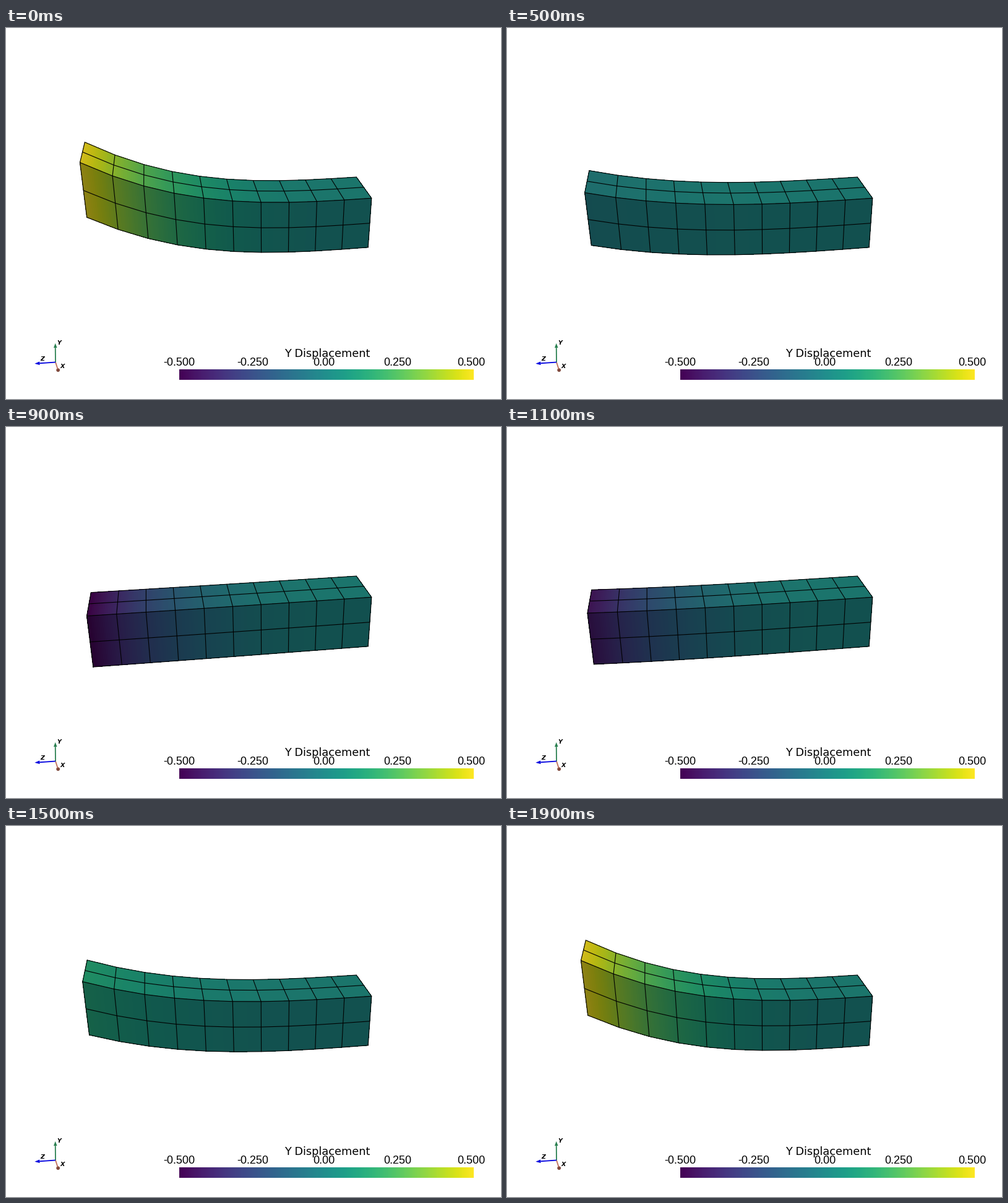
A matplotlib script for the animation above (2000 ms loop, 800 px wide and 600 px high).

```python
import numpy as np
import matplotlib.pyplot as plt
from matplotlib.animation import FuncAnimation
from matplotlib.collections import LineCollection, PolyCollection

W, H, DPI = 800, 600, 100
PX = 72 / DPI
FRAMES, INTERVAL = 20, 100
CELLS, STRIPS = 10, 16
LENGTH, PEAK = 5.0, 0.5
TOP_LIGHT = np.array([0.83, 0.81, 0.765])
FRONT_LIGHT = 0.56
VIRIDIS = plt.get_cmap("viridis")

# Perspective camera with a 30 degree vertical view angle.
EYE = np.array([11.915, 6.114, 3.612])
FOCUS = np.array([0, 0.375, 2])
VIEW_UP = np.array([-0.4255, 0.9024, -0.0679])
ZOOM = H / 2 / np.tan(np.radians(15))


def unit(vector):
    return vector / np.linalg.norm(vector)


FORWARD = unit(FOCUS - EYE)
RIGHT = unit(np.cross(FORWARD, VIEW_UP))
UP = np.cross(RIGHT, FORWARD)


def project(x, y, z):
    ray = np.stack(np.broadcast_arrays(x, y, z), axis=-1) - EYE
    scale = ZOOM / (ray @ FORWARD)
    return np.column_stack([W / 2 + scale * (ray @ RIGHT),
                            H / 2 - scale * (ray @ UP)])


def strips(a, b):
    return np.stack([a[:-1], a[1:], b[1:], b[:-1]], axis=1)


fig = plt.figure(figsize=(W / DPI, H / DPI), dpi=DPI, facecolor="white")
ax = fig.add_axes([0, 0, 1, 1])
ax.axis("off")


def label(x, y, text, size, font, **style):
    ax.text(x, y, text, fontsize=size * PX, family=font, ha="center",
            va="baseline", color="black", **style)


def draw_color_bar(left=280, right=756, top=552, bottom=569):
    ax.imshow(np.linspace(0, 1, 256)[None], cmap=VIRIDIS, aspect="auto",
              interpolation="nearest", extent=(left, right, bottom, top))
    label(519, 532, "Y Displacement", 17.7, "DejaVu Sans")
    for value in np.linspace(-PEAK, PEAK, 5):
        x = left + (right - left) * (value + PEAK) / (2 * PEAK)
        # Labels without a minus sign sit a little to the left.
        label(x if value < 0 else x - 4, 546.5, f"{value:#.3g}", 18,
              "Liberation Sans")


def draw_axes_marker(origin=(80, 540.5), size=34):
    origin = np.array(origin)
    looks = [("X", "#c0705c", (6, -5)), ("Y", "#2a8050", (6, 2)),
             ("Z", "#0000e0", (12, -5))]
    for axis, (name, color, offset) in enumerate(looks):
        step = size * np.array([RIGHT[axis], -UP[axis]])
        tip, neck = origin + step, origin + 0.76 * step
        side = 2.8 * unit(np.array([-step[1], step[0]]))
        ax.plot(*zip(origin, neck), color=color, lw=1.8 * PX,
                solid_capstyle="butt")
        if name == "X":  # this cone points at the viewer
            ax.add_patch(plt.Circle((tip + neck) / 2, 2.9, color="#80493c", lw=0))
        else:
            ax.fill(*zip(tip, neck + side, neck - side), color=color, lw=0)
        label(*(tip + offset), name, 9.5, "DejaVu Sans",
              weight="bold", style="italic")


draw_color_bar()
draw_axes_marker()
ax.set_xlim(0, W)
ax.set_ylim(H, 0)

faces = PolyCollection([], antialiased=False, linewidth=0, zorder=3)
edges = LineCollection([], colors="black", linewidths=1.1 * PX, zorder=4,
                       capstyle="round", joinstyle="round")
ax.add_collection(faces, autolim=False)
ax.add_collection(edges, autolim=False)

nodes = np.linspace(0, LENGTH, CELLS + 1)
slices = np.linspace(0, LENGTH, CELLS * STRIPS + 1)
node_shape = PEAK * (nodes / LENGTH) ** 3
slice_shape = np.interp(slices, nodes, node_shape)


def draw(frame):
    swing = np.cos(2 * np.pi * frame / (FRAMES - 1))

    # The rest shape is already bent once by the same displacement.
    lift = (1 + swing) * slice_shape
    back, ridge, base = (project(x, y + lift, slices)
                         for x, y in [(0, 1), (1, 1), (1, 0)])
    value = swing * (slice_shape[:-1] + slice_shape[1:]) / 2
    color = VIRIDIS((value + PEAK) / (2 * PEAK))[:, :3]
    faces.set_verts(np.concatenate([strips(back, ridge), strips(ridge, base)]))
    faces.set_facecolor(np.concatenate([color * TOP_LIGHT, color * FRONT_LIGHT]))

    lift = (1 + swing) * node_shape
    rails = [project(x, y + lift, nodes)
             for x, y in [(0, 1), (0.5, 1), (1, 1), (1, 0.5), (1, 0)]]
    ribs = [np.array(rib) for rib in zip(*rails)]
    edges.set_segments(rails + ribs)
    return faces, edges


animation = FuncAnimation(fig, draw, frames=FRAMES, interval=INTERVAL,
                          repeat=True, repeat_delay=0, blit=False)
plt.show()
```
